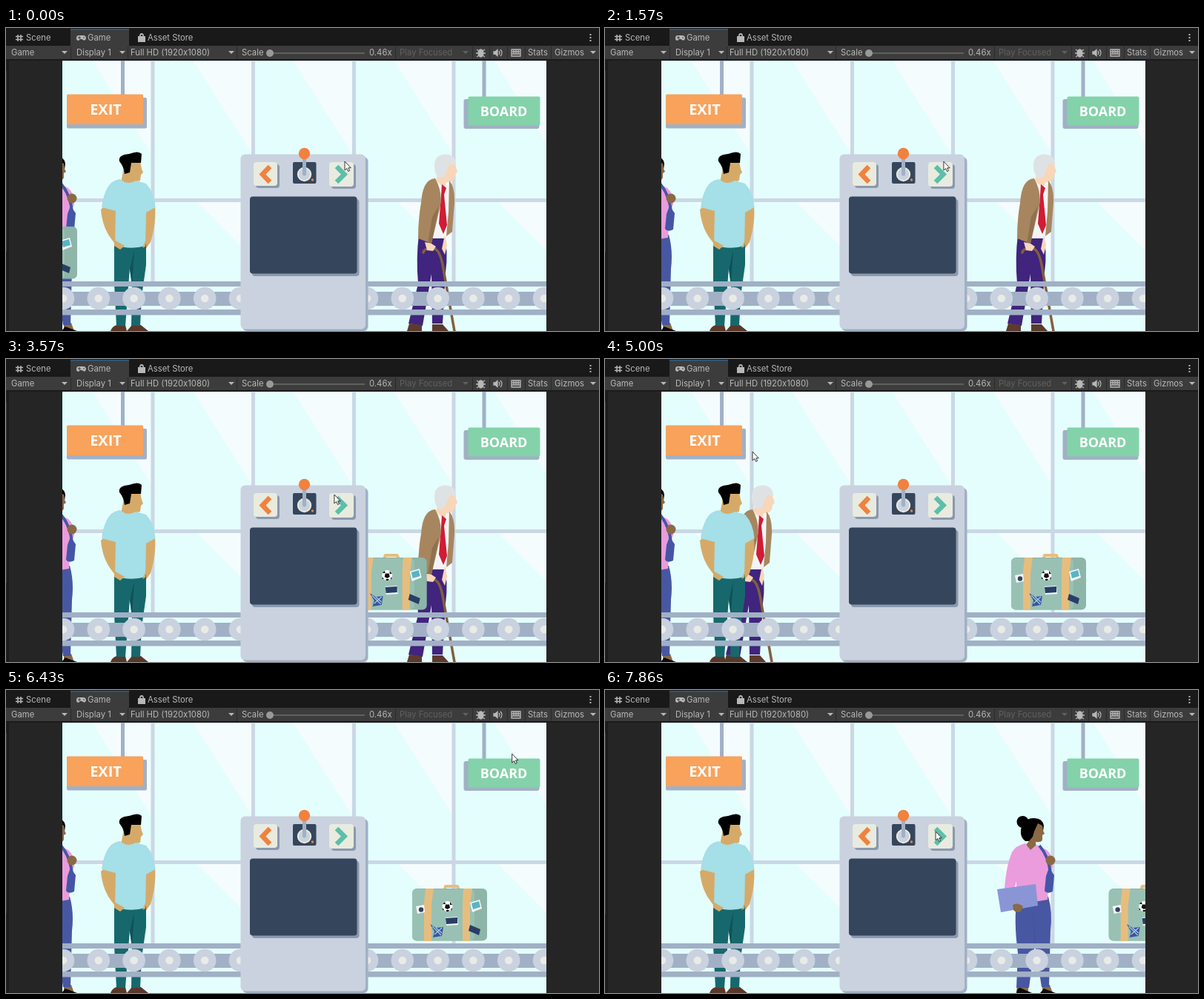
Write an HTML page that moves like this. It is 800 px wide and 409 px high and loops after 8 s.

```html
<!DOCTYPE html>
<html lang="en">
<head>
<meta charset="utf-8">
<title>Airport scanner</title>
<style>
  html, body { margin: 0; width: 100%; height: 100%; overflow: hidden; background: #252525; }
  svg { display: block; width: 100vw; height: 100vh; }
  .ui { font: 11.3px Inter, sans-serif; }
  .sign { font-family: "Open Sans", "Noto Sans", sans-serif; font-weight: 700; fill: #fff; text-anchor: middle; }
  .line { fill: none; stroke-linecap: round; stroke-linejoin: round; }
  .item { fill: #78bfc7; stroke: #20919a; stroke-width: 2.2; stroke-linejoin: round; }
</style>
</head>
<body>
<svg viewBox="0 0 800 409" preserveAspectRatio="none">
  <defs>
    <clipPath id="view"><path d="M76 44H729V409H76Z"/></clipPath>
    <linearGradient id="red" x2="0" y2="1">
      <stop stop-color="#d8152c"/><stop offset=".55" stop-color="#c80c22"/><stop offset="1" stop-color="#8d0718"/>
    </linearGradient>
    <linearGradient id="rim" x2="0" y2="1"><stop stop-color="#bfc0c2"/><stop offset=".8" stop-color="#e6e6e6"/><stop offset="1" stop-color="#aaaaad"/></linearGradient>
  </defs>

  <g id="editor">
    <path fill="#252525" d="M0 0H800V409H0Z"/>
    <path fill="#191919" d="M0 0H800V24H0Z"/>
    <path fill="#3c3c3c" d="M0 24H800V42H0ZM87 2H166V25H87Z"/>
    <path fill="#2c5d87" d="M87 1H166V2.500H87Z"/>
    <path fill="#1b1b1b" d="M0 42H800V44H0ZM1 43H4V409H1Z"/>
    <path fill="#3c3c3c" d="M0 58H1V302H0Z"/>
    <path stroke="#2b2b2b" d="M87.500 25V42M164.500 25V42M311.500 25V42M525.500 25V42M629.500 25V42M652.500 25V42M676.500 25V42M700.500 25V42M735.500 25V42"/>
    <g id="labels" class="ui"></g>
    <path stroke="#b8b8b8" stroke-width="1.500" d="M16 9V18M20 9V18M13 11.500H23M13 15.500H23"/>
    <path fill="#b8b8b8" d="M98 10H104Q108 10 108 14Q107 18 104 16L102 15H100L98 17Q95 17 95 14Q95 10 98 10Z"/>
    <path stroke="#3c3c3c" d="M97 13H101M99 11V15M104 13H106"/>
    <path fill="#b8b8b8" d="M178 11H188V19H178ZM180 11Q180 7 183 7T186 11H184.500Q184.500 9 183 9T181.500 11Z"/>
    <path fill="#b8b8b8" d="M787.500 8H789.500V10H787.500ZM787.500 12H789.500V14H787.500ZM787.500 16H789.500V18H787.500Z"/>
    <path stroke="#606060" stroke-width="2" d="M356 34H484"/>
    <circle cx="356" cy="34" r="5" fill="#999"/>
    <path fill="#b8b8b8" d="M75 31H83L79 35ZM153 31H161L157 35ZM300 31H308L304 35ZM788 31H796L792 35Z"/>
    <path fill="#606060" d="M616 31H624L620 35Z"/>
    <g fill="none" stroke="#b8b8b8" stroke-width="1.300">
      <ellipse cx="640.500" cy="34" rx="3.500" ry="5" fill="#b8b8b8"/>
      <path d="M635 29L638 31M646 29L643 31M634 34H647M635 39L638 37M646 39L643 37"/>
      <path fill="#b8b8b8" d="M658 32H660L663 29.500V37.500L660 35H658Z"/>
      <path d="M665 31Q667 33.500 665 36M667 29Q671 33.500 667 38"/>
      <path d="M682 29H694V38H682ZM682 32H694M682 35H694M685 29V35M688 29V35M691 29V35"/>
    </g>
  </g>

  <g clip-path="url(#view)">
    <g id="airport">
      <path fill="#e4fefd" d="M76 43H729V409H76Z"/>
      <g id="gleams" fill="#f4fcfe"></g>
      <path stroke="#cbd7e4" stroke-width="5" d="M198 43V345M333.500 43V345M469.500 43V345M604 43V345M76 232.500H729"/>
      <path stroke="#cbd7e4" d="M76 44.500H729"/>
      <path stroke="#a1b0c5" stroke-width="5" d="M157.500 43V92M645 43V95"/>
      <rect x="82" y="94" width="108" height="41.500" rx="2" fill="#a1b0c5"/>
      <rect x="82" y="89.500" width="103" height="40.500" rx="1.500" fill="#f8a25c"/>
      <text class="sign" x="134.500" y="117" font-size="20">EXIT</text>
      <rect x="617.500" y="96" width="102" height="40" rx="3" fill="#a1b0c5"/>
      <rect x="623.500" y="92.500" width="97" height="39" rx="2" fill="#84d2aa"/>
      <text class="sign" x="671.500" y="118.500" font-size="18">BOARD</text>

      <g id="woman">
        <path fill="#8a6945" d="M556 398L571 398 571 409 555 409ZM590 398L600 398 604 409 590 409Z"/>
        <path fill="#4857a2" d="M556 281L598 279Q604 300 601 325L599 401H589L580 342 572 402H555L557 355Q551 310 556 281Z"/>
        <path fill="#37458c" d="M580 342L577 300 582 360Z"/>
        <path fill="#0b0b0c" d="M555 409Q556 402 560 402L576 409ZM587 409L592 403 608 409Z"/>
        <circle cx="563.500" cy="178" r="8"/>
        <path d="M561 189Q563 174 577 173Q590 172 592 183L591 191 580 204H567Q560 199 561 189Z"/>
        <path fill="#8a6945" d="M584 180L590 183 591 190 593 194 590 196V202Q589 206 581 205L582 217 574 219 568 209 577 198 579 191Z"/>
        <path fill="#ea9cdd" d="M567 207L574 216 582 209 596 216Q605 224 604 238L599 250 597 283 555 290V258L551 273 539 268Q541 238 549 219 554 210 567 207Z"/>
        <path fill="none" stroke="#4455a5" stroke-width="4" d="M586 210Q599 225 601 248"/>
        <path fill="#4455a5" d="M599 240L606 250 604 272Q596 276 593 271L595 251Z"/>
        <circle cx="601" cy="230" r="6.500" fill="#8a6945"/>
        <path fill="#8a95d5" d="M529 269L581 262 584 291 534 300Z"/>
        <path fill="#8a6945" d="M550 290Q557 286 564 292L561 299Q555 302 551 297Z"/>
      </g>

      <g id="elder">
        <path fill="#40247d" d="M557 279H591Q597 300 593 330L589 399H575L574 332 562 402 543 399 556 345Q553 310 557 279Z"/>
        <path fill="#5c3b2e" d="M541 409L544 399 561 401V409ZM575 409V400H589L597 409Z"/>
        <path fill="#f3f5f5" d="M580 204L598 207Q605 222 600 250L594 284H571Z"/>
        <path fill="#f8d6b9" d="M586 184L604 180 607 188 609 194 606 197 605 203Q602 209 594 208L591 216 580 206Z"/>
        <path fill="#dfe2e4" d="M578 187Q577 171 593 170.500Q607 171 607 185L599 183 596 189 592 200 585 203Q578 198 578 187Z"/>
        <path fill="#d01c35" d="M588 211L594 216 591 225 595 266 590 278 584 264 587 226Z"/>
        <path fill="#a7865f" d="M579 203Q589 221 586 240L574 291 556 284Q556 258 560 236 562 204 579 203ZM598 206Q606 215 605 236L602 275 594 281 597 248Z"/>
        <path fill="#8f714f" d="M584 240L574 291 569 291 575 255Z"/>
        <path class="line" stroke="#835f3d" stroke-width="3.500" d="M563 303Q565 296 578 298 586 300 590 325L605 409"/>
        <path fill="#f8d6b9" d="M565 289L574 291 580 295 576 301 568 300ZM592 279L595 293 592 306 588 298Z"/>
      </g>

      <g id="man">
        <path fill="#d5aa69" d="M135 238L128 245Q130 270 143 286L153 299 161 295 148 269 148 242ZM187 240L201 240Q203 264 195 289L188 299 185 289Z"/>
        <path fill="#59382a" d="M141 409Q143 403 149 401H161L163 409ZM163 409L170 401H182L192 409Z"/>
        <path fill="#17686c" d="M146 291H189V320L183 362 181 402H169L170 350 167 324 161 402H149L146 345Z"/>
        <path fill="#0f5258" d="M167 326L173 300 170 346Z"/>
        <path fill="#d5aa69" d="M159 188L169 181 181 180 183 190 185 195 182 198 181 206 173 208 174 217 155 209Z"/>
        <path d="M153 180Q151 171 166 170 179 165 183 170L182 182 169 182 167 195 160 197Q159 187 153 180Z"/>
        <path fill="#a5dfe7" d="M154 204Q164 213 175 206L189 210Q200 222 201.500 242L189 249 188 294Q168 300 147 293L148 247 129 242Q132 219 142 209 147 205 154 204Z"/>
        <path fill="#d5aa69" d="M146 286L160 294 154 299 146 294ZM190 283L188 295 184 297Z"/>
      </g>

      <g id="belt"></g>

      <g id="suitcase">
        <path class="line" stroke="#e7bd7e" stroke-width="4" d="M586 273H617M591 272L593 265H609L612 272"/>
        <rect x="548" y="268" width="101" height="70.500" rx="6" fill="#8db5a8"/>
        <rect x="548" y="269" width="84" height="69.500" rx="6" fill="#98c1b4"/>
        <path fill="#e7bd7e" d="M566 268H577L574 290V339H564V288ZM617 268H629L626 290V339H616V288Z"/>
        <circle cx="595.500" cy="292" r="7" fill="#fff"/>
        <path fill="#111" d="M593 289.500H598L599 294 595.500 296 592 294ZM589 289L592 286 593 289ZM599 286L602 290 599 290ZM594 297H598L597 299H594ZM589 294L591 297 589 297ZM600 296L602 294 601 298Z"/>
        <path fill="#f5f7f8" d="M553 292L564 290 565 300 555 302ZM626 287L639 283 642 295 629 300ZM593 307L609 306 610 317 594 318Z"/>
        <circle cx="560" cy="296.500" r="3.200" fill="#35455c"/>
        <path fill="#59b4c3" d="M628 288L638 285 640 293 630 296Z"/>
        <path fill="#293e66" d="M593 308L609 307V315L594 316ZM626 317L640 323 638 331 624 325Z"/>
        <path fill="#4052a1" d="M572 316L580 321 590 320 588 332 576 334 578 326Z"/>
        <path stroke="#9bd3df" stroke-width="1.200" d="M575 319L587 331M580 321L588 328M578 330L588 321"/>
      </g>

      <g id="console">
        <rect x="319" y="174" width="169.500" height="235" rx="6" fill="#a1b0c5"/>
        <rect x="316.500" y="170.500" width="168.500" height="236" rx="6" fill="#c9d2de"/>
        <g fill="#8b99ad"><rect x="337" y="184" width="32" height="32" rx="4"/><rect x="439" y="184" width="33" height="33" rx="4"/><rect x="332" y="231" width="144.500" height="104" rx="4"/></g>
        <g fill="#e9ebdf"><rect x="334" y="181" width="32" height="32" rx="4"/><rect x="436" y="181" width="33" height="33" rx="4"/></g>
        <g fill="none" stroke-width="6.500">
          <path stroke="#f1813f" d="M356 187L346 197.500 356 208"/>
          <path stroke="#5cbfa9" d="M446 187L456.500 197.500 446 208"/>
        </g>
        <rect x="329" y="227.500" width="144.500" height="104" rx="4" fill="#35455c"/>
        <rect x="387" y="181" width="31.500" height="29" rx="2" fill="#35455c"/>
        <circle cx="402.500" cy="197.500" r="8.700" fill="#c9d2de" stroke="#e9ebdf" stroke-width="2"/>
        <path class="line" stroke="#a1b0c5" stroke-width="5" d="M402.500 175V197"/>
        <circle cx="402.500" cy="169.500" r="7.700" fill="#f1813f"/>
        <circle cx="413.500" cy="205" r="1.700" fill="#f1813f"/>
      </g>
    </g>

    <g id="xray">
      <path fill="#334d77" d="M76 43H729V409H76Z"/>
      <path fill="#7e8295" d="M143 109H510V343.500H143Z"/>
      <path fill="#afafb8" d="M162 130H489V323.500H162Z"/>
      <path fill="#d1cdca" d="M213 257.500L241 240 269 257.500 241 275Z"/>
      <g class="item">
        <path d="M231 181H271L279 219 256 224 250 202 244 224 221 218Z"/>
        <path fill="none" d="M230 185H272M229 191Q236 199 242 186M273 191Q265 199 260 186"/>
        <path stroke-width="1.500" d="M310 148H323L322 171Q325 179 336 178 344 179 344 184 343 189 328 188 313 188 311 181L312 168Z"/>
        <path stroke-width="1.500" fill="#4ca5ae" d="M310 152H323M310 176Q320 176 318 187 311 185 310 176ZM335 178Q344 178 344 184 342 189 334 187Z"/>
        <path d="M441 117C452 115 455 126 452 139C449 150 452 157 451 170C450 186 431 186 430 172C430 158 425 149 427 136C429 125 433 118 441 117Z"/>
        <path fill="none" d="M430 158Q429 140 441 133 448 143 447 160M441 133L442 128M430 158Q433 144 441 137 446 147 447 160"/>
        <path d="M268 266Q266 259 281 257L279 249Q283 239 300 239 314 235 318 243L320 250Q335 245 337 250 339 258 317 266 278 277 268 266Z"/>
        <path fill="none" d="M280 251Q301 252 319 244M281 257Q303 261 320 250M280 260Q304 267 323 253"/>
        <path d="M415 244Q424 239 437 243 438 254 427 257 414 260 415 244ZM444 243Q457 239 466 244 467 259 453 257 443 253 444 243ZM436 243Q440 240 445 243V247Q440 244 436 247Z"/>
        <path stroke="#c5e5e8" stroke-width="1" d="M421 252L428 246M452 252L459 246"/>
      </g>
      <ellipse cx="610" cy="314" rx="52" ry="30.500" fill="#a9abb0"/>
      <ellipse cx="610" cy="311" rx="52" ry="30" fill="url(#rim)"/>
      <ellipse cx="610" cy="307" rx="44" ry="24" fill="#626a79"/>
      <path fill="url(#red)" d="M568 287Q569 262 610 262T654 287L650 312Q637 329 610 329T571 312Z"/>
      <ellipse cx="611" cy="284" rx="42" ry="21" fill="#d3152b"/>
      <path fill="#e96f7d" opacity=".75" d="M583 271Q600 263 623 265 601 267 588 274ZM571 290Q576 302 593 304 579 306 572 298ZM635 296Q646 290 648 283 650 295 637 302Z"/>
      <path class="line" stroke="#8b99b4" d="M567 289Q566 263 610 260.500T655 289"/>
    </g>
  </g>
  <path id="cursor" fill="#fff" stroke="#222" stroke-width=".9" stroke-linejoin="round" d="M0 0V12L2.800 9.500 4.600 13.500 6.600 12.600 4.800 8.800H8.300Z"/>
</svg>
<script>
  const $ = id => document.getElementById(id);

  const labels = [
    ["Scene", 27, 17], ["Game", 110, 17], ["Asset Store", 191, 17], ["Game", 7, 37],
    ["Display 1", 95, 37], ["Full HD (1920x1080)", 168, 37], ["Scale", 318, 37],
    ["0.46x", 490, 37], ["Play Focused", 531, 37, "#606060"], ["Stats", 704, 37], ["Gizmos", 740, 37]
  ];
  $("labels").innerHTML = labels.map(([text, x, y, color = "#b8b8b8"]) =>
    `<text x="${x}" y="${y}" fill="${color}">${text}</text>`).join("");

  $("gleams").innerHTML = [65, 201, 336, 472, 607].map(x =>
    `<path d="M${x + 52} 45H${x + 130}V168ZM${x + 57} 235H${x + 130}V308Z"/>`).join("");

  const rollers = [77, 487].flatMap(start => [0, 1, 2, 3, 4, 5].map(i => start + i * 47.8));
  $("belt").innerHTML =
    `<path fill="#a1b0c5" d="M76 342H729V349H76ZM76 356H729V375H76ZM76 380H729V387.500H76Z"/>` +
    rollers.map(x => `<circle cx="${x}" cy="365" r="15.300" fill="#c9d2de"/><circle cx="${x}" cy="365" r="5.300" fill="#e9ebe6"/>`).join("");

  // Each row is a time in ms followed by the values at that time.
  const tracks = {
    suitcase: [[140, -553], [1140, -197], [3246, -197], [3800, 0], [7490, 0], [8000, 183]],
    elder: [[3940, 0], [5000, -380], [5060, -400]],
    woman: [[6430, -512], [7857, 0]],
    cursor: [
      [1571, 457, 180], [1857, 420, 260], [2286, 560, 250], [2714, 608, 292], [3000, 608, 292],
      [3286, 460, 190], [3571, 443, 183], [3857, 345, 192], [4000, 345, 192], [4430, 123, 190],
      [4571, 141, 172], [5000, 199, 125], [5143, 199, 125], [5714, 669, 123], [6143, 690, 74],
      [6428, 683, 86], [6857, 452, 182], [7428, 447, 190], [7857, 446, 191]
    ]
  };
  const LOOP = 8000, STEP = 1000 / 7;

  function sample(rows, time) {
    const next = rows.findIndex(row => row[0] > time);
    if (next === 0) return rows[0].slice(1);
    if (next < 0) return rows.at(-1).slice(1);
    const a = rows[next - 1], b = rows[next];
    const k = (time - a[0]) / (b[0] - a[0]);
    return a.slice(1).map((v, i) => v + (b[i + 1] - v) * k);
  }

  const show = (id, on) => $(id).setAttribute("display", on ? "inline" : "none");

  function draw(time) {
    for (const id in tracks) {
      const [x, y = 0] = sample(tracks[id], time);
      $(id).setAttribute("transform", `translate(${x.toFixed(1)} ${y.toFixed(1)})`);
    }
    show("elder", time < 5250);
    show("xray", time >= 1990 && time < 3140);
  }

  const start = performance.now();
  function tick() {
    const time = (performance.now() - start) % LOOP;
    draw(Math.floor((time + 5) / STEP) * STEP % LOOP);
    requestAnimationFrame(tick);
  }
  tick();
</script>
</body>
</html>
```
